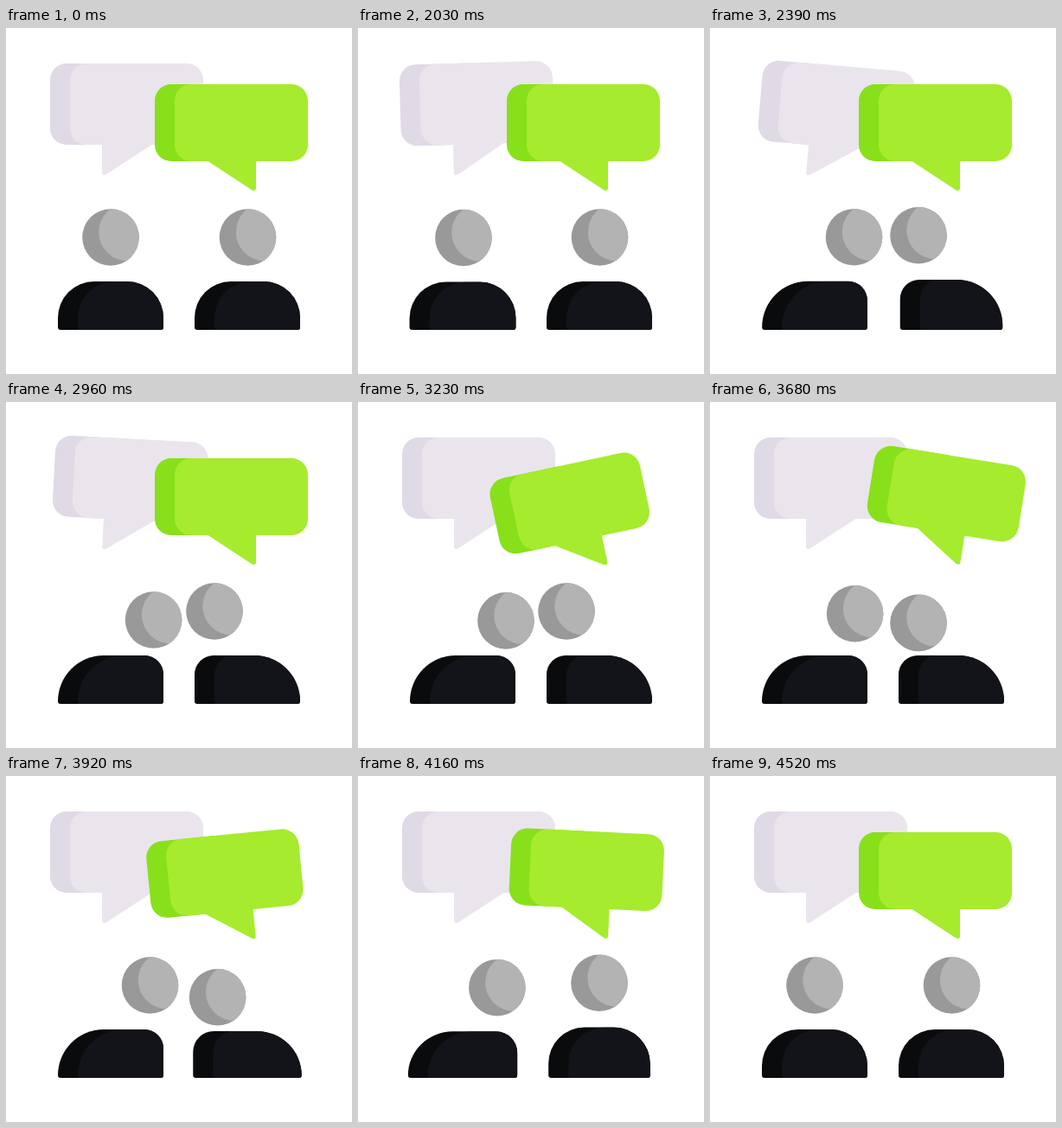
These frames come from a looping animation (400 by 400 pixels, 4.55 s). An HTML page:

```html
<!DOCTYPE html>
<html lang="en">
<head>
<meta charset="utf-8">
<title>Two people chatting</title>
<style>
  html, body { margin: 0; width: 100%; height: 100%; overflow: hidden; background: #fff; }
  svg { display: block; width: 100%; height: 100%; }
</style>
</head>
<body>
<svg viewBox="0 0 400 400">
  <defs>
    <clipPath id="clipA"><path id="maskA"/></clipPath>
    <clipPath id="clipB"><path id="maskB"/></clipPath>
    <clipPath id="face"><circle r="32.8"/></clipPath>
    <g id="head">
      <circle r="32.8" fill="#999"/>
      <circle cx="19.5" cy="-6" r="33.2" fill="#b3b3b3" clip-path="url(#face)"/>
    </g>
  </defs>

  <g id="bubbleA">
    <rect x="51" y="41" width="100" height="94" rx="19" fill="#e0d9e6"/>
    <rect x="74" y="41" width="154" height="94" rx="19" fill="#eae5ed"/>
    <path d="M111 133V167Q111 171 115.500 169.500L170 134V133Z" fill="#eae5ed"/>
  </g>
  <g id="bubbleB">
    <rect x="172" y="65" width="100" height="89" rx="19" fill="#88e01a"/>
    <rect x="195" y="65" width="154" height="89" rx="19" fill="#a6eb2e"/>
    <path d="M289 152V185Q289 189 284.500 187.500L232 153V152Z" fill="#a6eb2e"/>
  </g>

  <g id="bodyA">
    <path class="dark" fill="#090b0d"/>
    <g clip-path="url(#clipA)"><path class="light" fill="#121419"/></g>
  </g>
  <g id="bodyB">
    <path class="dark" fill="#090b0d"/>
    <g clip-path="url(#clipB)"><path class="light" fill="#121419"/></g>
  </g>
  <use id="headA" href="#head"/>
  <use id="headB" href="#head"/>
</svg>
<script>
const LOOP = 4550, STEP = 30, BUBBLE_LAG = 1117;
const $ = id => document.getElementById(id);
const mix = (a, b, k) => a + (b - a) * k;
const ease = k => (1 - Math.cos(Math.PI * Math.min(1, Math.max(0, k)))) / 2;

// Eased value of a [time, value] table
function at(keys, t) {
  if (t <= keys[0][0]) return keys[0][1];
  for (let i = 1; i < keys.length; i++) {
    const [t0, a] = keys[i - 1], [t1, b] = keys[i];
    if (t < t1) return mix(a, b, ease((t - t0) / (t1 - t0)));
  }
  return keys[keys.length - 1][1];
}

const swing = [[1990, 0], [2215, -21], [2490, 15.5], [2705, -9], [2985, 3.3], [3200, 0]];
const squash = [[0, 0], [0.3, 1], [0.72, -0.7], [1, 0]];

const people = [
  { id: 'A', x: 121, headX: 121, reach: 45.5, go: 2000, back: 4085, outer: 'left', nodX: 4.5,
    nod: [[2600, 0], [2780, 11.5], [2960, 10], [3300, 11], [3520, 11], [3760, 0]] },
  { id: 'B', x: 279, headX: 279.5, reach: -38.5, go: 2060, back: 3855, outer: 'right', nodX: 0,
    nod: [[3440, 0], [3600, 13.5], [3850, 13], [4170, 0]] }
];
const SPAN = 410;

// Shoulders: a flat base with separate left and right corner radii
function shoulders(x0, x1, top, rl, rr) {
  const base = 349, c = 3;
  const h = base - c - top;
  const yl = Math.min(rl, h), yr = Math.min(rr, h);
  return `M${x0 + c} ${base}Q${x0} ${base} ${x0} ${base - c}V${top + yl}` +
    `A${rl} ${yl} 0 0 1 ${x0 + rl} ${top}H${x1 - rr}` +
    `A${rr} ${yr} 0 0 1 ${x1} ${top + yr}V${base - c}Q${x1} ${base} ${x1 - c} ${base}Z`;
}

function drawPerson(p, t) {
  const a = (t - p.go) / SPAN, b = (t - p.back) / SPAN;
  const lean = ease(a / 0.8) - ease(b / 0.8);
  const press = at(squash, a) + at(squash, b);
  const nod = at(p.nod, t);

  const half = 61 + 3.2 * press, top = 293 + 3.5 * press;
  const wide = mix(42, 53, lean), tight = mix(42, 22, lean);
  const [rl, rr] = p.outer === 'left' ? [wide, tight] : [tight, wide];
  const x0 = p.x - half, x1 = p.x + half;
  const shape = shoulders(x0, x1, top, rl, rr);
  const body = $('body' + p.id);
  $('mask' + p.id).setAttribute('d', shape);
  body.querySelector('.dark').setAttribute('d', shape);
  body.querySelector('.light').setAttribute('d', shoulders(x0 + 23, x1 + 23, top, rl, rr));

  const hx = p.headX + p.reach * lean + p.nodX * nod / 11;
  const hy = 242 + 4 * press + nod;
  $('head' + p.id).setAttribute('transform', `translate(${hx} ${hy})`);
}

function draw(ms) {
  const t = Math.floor((ms + 10) / STEP) * STEP - 10;
  $('bubbleA').setAttribute('transform', `rotate(${at(swing, t)} 112 170)`);
  $('bubbleB').setAttribute('transform', `rotate(${at(swing, t - BUBBLE_LAG)} 288 188)`);
  people.forEach(p => drawPerson(p, t));
}

const start = performance.now();
function tick() {
  draw((performance.now() - start) % LOOP);
  requestAnimationFrame(tick);
}
tick();
</script>
</body>
</html>
```
